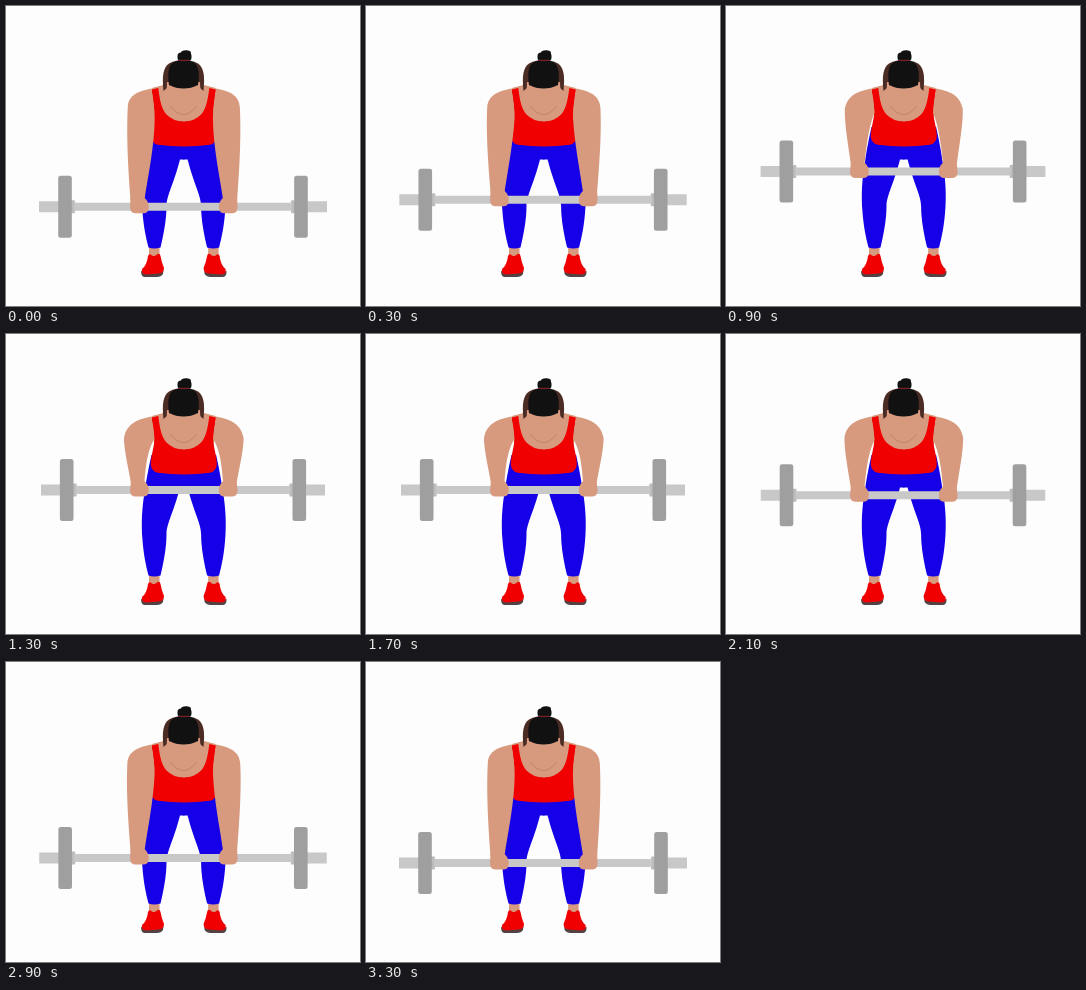
Write an HTML page with a canvas that moves like this. It is 354 px wide and 300 px high and loops after 3.4 s.

```html
<!DOCTYPE html>
<html lang="en">
<head>
<meta charset="utf-8">
<title>Barbell row</title>
<style>
  html, body { margin: 0; width: 100%; height: 100%; overflow: hidden; background: #fdfdfd; }
  canvas { display: block; }
</style>
</head>
<body>
<canvas id="stage" width="354" height="300"></canvas>
<script>
const ctx = document.getElementById('stage').getContext('2d');
const LOOP = 3400, STEP = 100, MID = 177.8;
const SKIN = '#d79a7f', RED = '#f00000', BLUE = '#1500e8', HAIR = '#111111';
const BROWN = '#4b2c25', STEEL = '#c8c8c8', PLATE = '#9f9f9f';

const mix = (a, b, k) => a + (b - a) * k;
const ease = k => (1 - Math.cos(Math.PI * Math.min(1, Math.max(0, k)))) / 2;

// 0 = arms straight, 1 = bar pulled up
function lift(t) {
  if (t > 3300) t -= LOOP;
  return t < 1570 ? ease((t + 63) / 1384) : 1 - ease((t - 1780) / 1430);
}

function fill(path, color) {
  ctx.fillStyle = color;
  ctx.fill(new Path2D(path));
}

function line(path, color, width) {
  ctx.strokeStyle = color;
  ctx.lineWidth = width;
  ctx.stroke(new Path2D(path));
}

function oval(x, y, rx, ry, color) {
  ctx.fillStyle = color;
  ctx.beginPath();
  ctx.ellipse(x, y, rx, ry, 0, 0, Math.PI * 2);
  ctx.fill();
}

function box(x, y, w, h, r, color) {
  ctx.fillStyle = color;
  ctx.beginPath();
  ctx.roundRect(x, y, w, h, r);
  ctx.fill();
}

function bothSides(draw) {
  draw();
  ctx.save();
  ctx.translate(MID * 2, 0);
  ctx.scale(-1, 1);
  draw();
  ctx.restore();
}

function leg() {
  box(143, 236, 10.5, 16, 2, SKIN);
  fill('M178.5 120 L145.5 121 C143.5 130 140.5 144 139 156 C136 172 135 190 136.5 206 C137.5 220 140 232 142.5 241.5 Q148 243.5 154.5 241.5 C157.5 229 160.5 214 160.5 200 C160.5 190 168 177 174 153.5 L178.5 153.5 Z', BLUE);
  fill('M135 265 Q146 268 157.5 264 L157 268 Q155 271 151 271 L139 271 Q135 271 135 265 Z', '#514343');
  fill('M142 250 Q143 247 146 249.5 Q149 251 151.5 248 Q154 247 154.5 250 Q155.5 256 158 262 Q158 267 153 267.5 L140 268.5 Q135 268 136 263 Q141 259 142 250 Z', RED);
}

function torso() {
  fill('M161 78 L146 82 L149 124 L207 124 L209.6 82 L194 78 Z', SKIN);
  fill('M145.5 83.5 L152.3 82 C153.5 92 155 102 160 108 Q167 115.5 177.8 115.5 Q188.6 115.5 195.6 108 C200.6 102 202 92 203.3 82 L210 83.5 C209 92 207.5 100 207.3 106 C207.5 114 211 122 210.8 131 Q210 137 204 138.8 Q178 142 151.6 138.8 Q145.6 137 144.8 131 C144.6 122 148.1 114 148.3 106 C148 100 146.5 92 145.5 83.5 Z', RED);
}

function head() {
  box(171.5, 46.5, 14, 8.5, 3.5, HAIR);
  oval(180, 47, 5, 2.8, HAIR);
  fill('M157.5 85 C156 70 157 62 163 57.5 Q177.5 50 192 57.5 C198 62 199 70 197.5 85 L194 82 L161 82 Z', BROWN);
  fill('M161 76 L194 76 L194.5 86 Q193 109 177.5 109 Q162 109 160.5 86 Z', SKIN);
  fill('M163 79 C161.5 69 162 60 167 56.5 Q177.5 52 188 56.5 C193 60 193.5 69 192 79 Q185 82.5 177.5 82.5 Q170 82.5 163 79 Z', HAIR);
  line('M173 54 Q178 55.5 183 54', '#8b2024', 1);
  line('M164 100 Q177.5 117 191 100', '#c48369', 1);
}

function barbell(y, k) {
  const mid = 177, end = mix(144, 142, k), disc = mix(118, 116.3, k);
  for (const side of [-1, 1]) {
    const x = mid + side * (end + disc - 8) / 2;
    const w = end - disc + 8;
    box(x - w / 2, y - 5.5, w, 11, 0, STEEL);
    const collar = mid + side * (disc - 8);
    box(collar - 2, y - 6.5, 4, 13, 1, '#bcbcbc');
    box(mid + side * disc - 6.8, y - 31, 13.6, 62, 2.5, PLATE);
  }
  box(mid - disc + 9, y - 4, (disc - 9) * 2, 8, 0, STEEL);
}

function arm(y, k) {
  const m = (a, b) => mix(a, b, k);
  const wrist = y - 7;
  fill(`M152 81 L145.5 82.5 C134 85 ${m(122.5, 121)} 88 ${m(121.8, 118)} ${m(101, 104)}
    C${m(120.5, 118)} ${m(125, 116)} ${m(121.5, 122)} ${m(155, 132)} ${m(124.5, 125)} ${wrist}
    L${m(138.5, 138.3)} ${wrist}
    C${m(141.5, 139.5)} ${m(172, 139)} ${m(148.5, 140)} ${m(142, 118)} ${m(148.7, 148.5)} ${m(112, 105)}
    Q148 95 145.5 83.5 Z`, SKIN);
  fill(`M${m(124.5, 125)} ${wrist - 2} L${m(138.5, 138.3)} ${wrist - 2}
    Q142.8 ${y - 5} 142.8 ${y} Q142.8 ${y + 6} 138 ${y + 6.5}
    L129 ${y + 6.5} Q124 ${y + 6} 124 ${y} Z`, SKIN);
}

function draw(t) {
  const k = lift(t), y = mix(201, 156, k);
  ctx.fillStyle = '#fdfdfd';
  ctx.fillRect(0, 0, 354, 300);
  bothSides(leg);
  torso();
  barbell(y, k);
  bothSides(() => arm(y, k));
  head();
}

function tick() {
  const t = performance.now() % LOOP;
  draw(Math.floor(t / STEP) * STEP);
  requestAnimationFrame(tick);
}
tick();
</script>
</body>
</html>
```
